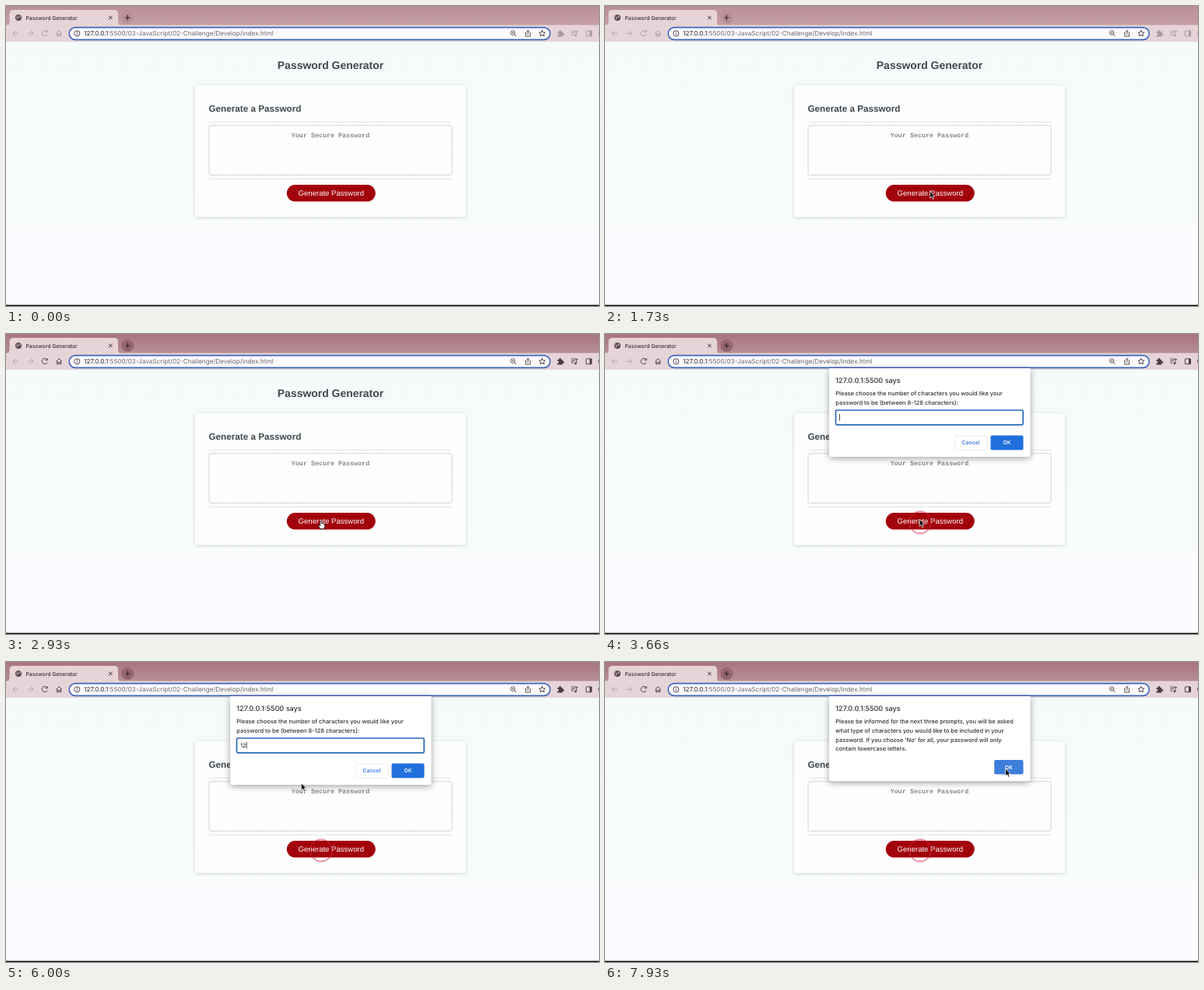
Animation of 762 by 386 pixels, one loop 8 s. Source, as an HTML page:

```html
<!DOCTYPE html>
<html lang="en">
<head>
<meta charset="utf-8">
<title>Password Generator</title>
<style>
  html, body { margin: 0; width: 100%; height: 100%; overflow: hidden; background: #fafbfd; }
  svg { display: block; width: 762px; height: 386px; }
  text { font-family: Inter, Roboto, sans-serif; fill: #303134; text-rendering: geometricPrecision; }
  .page text { font-family: "Liberation Sans", Arial, sans-serif; fill: #3f484d; }
  .page .mono { font: bold 8.37px "Liberation Mono", monospace; fill: #85888a; }
  .page .label { font-size: 9.56px; fill: #fff; }
  .bold { font-weight: bold; }
  .icon { fill: none; stroke: #55494d; stroke-width: 1; }
  .body { font-size: 7.45px; font-weight: 500; }
  .button { font-size: 6.8px; font-weight: 600; text-anchor: middle; }
  .says { font-size: 9.1px; font-weight: 500; }
  .panel { fill: #fff; filter: drop-shadow(0 2px 4px rgba(0, 0, 0, .36)); }
  #stage { --strip: #a87580; --strip-low: #b88e97; --ink: #4b4044; --plus: #966773; }
  #stage.inactive { --strip: #bb8e98; --strip-low: #c69fa7; --ink: #aa999d; --plus: #b98f99; }
  .state { stroke: var(--ink); }
</style>
</head>
<body>
<svg id="stage" viewBox="0 0 762 386">
  <defs>
    <linearGradient id="stripFill" x2="0" y2="1">
      <stop style="stop-color:var(--strip)"/>
      <stop offset="1" style="stop-color:var(--strip-low)"/>
    </linearGradient>
    <linearGradient id="pageFill" x2="0" y2="1">
      <stop stop-color="#f5fafb"/>
      <stop offset=".65" stop-color="#f8fbfc"/>
      <stop offset=".75" stop-color="#fafbfe"/>
    </linearGradient>
  </defs>

  <g class="page">
    <rect y="46" width="762" height="340" fill="url(#pageFill)"/>
    <text class="bold" x="417" y="81" font-size="13.95" text-anchor="middle">Password Generator</text>
    <rect x="243" y="102" width="348" height="169.5" rx="3" fill="#fdfdfe"
      style="filter:drop-shadow(0 1px 2px rgba(0,0,0,.16))"/>
    <text class="bold" x="260.5" y="136" font-size="11.7">Generate a Password</text>
    <path d="M261 149.2H573M261 222.4H573" stroke="#e2e4e6"/>
    <rect x="261" y="153.8" width="312" height="63.6" rx="2" fill="#fefefe" stroke="#bcbfc1" stroke-dasharray="1.8 .8"/>
    <text class="mono" x="417" y="169" text-anchor="middle">Your Secure Password</text>
    <rect x="360.8" y="230" width="114" height="21.6" rx="10.8" fill="#a2000b"/>
    <text class="label" x="417.8" y="244.3" text-anchor="middle">Generate Password</text>
    <circle id="ring" cx="405" cy="242.5" r="14" fill="none" stroke="#cc2637" stroke-opacity=".5" stroke-width="1.8"/>
    <rect y="384.6" width="762" height="1.4" fill="#080808"/>
  </g>

  <g>
    <rect width="762" height="25" fill="url(#stripFill)"/>
    <rect y="24.5" width="762" height="21.5" fill="#e6d4d8"/>
    <path d="M1 25Q4.5 24.5 4.5 21V10Q4.5 5 9.5 5H139Q144 5 144 10V21Q144 24.5 147 25Z" fill="#e6d4d8"/>
    <g class="icon">
      <circle cx="16" cy="15" r="3.6" fill="#55494d"/>
      <path d="M13 14L15.3 15 14.8 17M16.6 12.4L17 14 18.8 14.6" stroke="#e6d4d8"/>
      <path d="M132 12.7L136.6 17.3M136.6 12.7L132 17.3" stroke="#332b2e"/>
    </g>
    <text x="25.5" y="17.6" font-size="6.8" font-weight="500">Password Generator</text>
    <circle cx="156.3" cy="15" r="8" style="fill:var(--plus)"/>
    <path d="M152.8 15H159.8M156.3 11.5V18.5" stroke="#33272a" stroke-width="1.2"/>

    <g class="icon">
      <path d="M16.3 35.2H9M12.3 31.8L8.9 35.2 12.3 38.6M27.5 35.2H35M31.6 31.8L35 35.2 31.6 38.6" stroke="#b5a3a7"/>
      <path class="state" d="M52.6 33A3.5 3.5 0 1 0 53 36.4M53.3 31V33.6H50.7"/>
      <path class="state" d="M64.6 35.3L68.2 31.8 71.8 35.3M65.7 34.8V38.7H67.3V36.4H69.1V38.7H70.7V34.8"/>
      <rect x="81.2" y="27.6" width="618" height="15.8" rx="7.9" fill="#fdfcfd" stroke="#3d67bd" stroke-width="1.6"/>
      <circle cx="91.3" cy="35.3" r="3.6"/>
      <path d="M91.3 34.8V37.3M91.3 33V34"/>
      <circle cx="651.2" cy="34.5" r="2.7"/>
      <path d="M653.2 36.5L655.8 39M650 34.5H652.4"/>
      <path d="M669 34.3H667.8V39H673.7V34.3H672.5M670.8 36.8V31.5M669.2 33L670.8 31.4 672.4 33"/>
      <path d="M689 31.3L690.1 33.9 693 34.1 690.8 36 691.5 38.8 689 37.3 686.5 38.8 687.2 36 685 34.1 687.9 33.9Z"/>
      <path d="M708.5 33H710.7A1.4 1.4 0 1 1 713.3 33H715.2V35A1.4 1.4 0 1 1 715.2 37.5V39.4H708.5V37.3A1.3 1.3 0 1 0 708.5 34.9Z" style="fill:var(--ink);stroke:none"/>
      <path class="state" d="M726.3 32.2H733M726.3 34.6H731M726.3 37H729.5M733 38V32.5H735"/>
      <circle cx="731.8" cy="38" r="1.3" style="fill:var(--ink);stroke:none"/>
      <rect class="state" x="745.4" y="31.9" width="7.2" height="6.8" rx=".7"/>
      <path class="state" d="M751.2 32V38.6" stroke-width="2.4"/>
      <circle class="state" cx="765.5" cy="35.3" r="4"/>
    </g>
    <text x="100.2" y="38.3" font-size="8.16" style="fill:#66686b">
      <tspan fill="#232427">127.0.0.1</tspan>:5500/03-JavaScript/02-Challenge/Develop/index.html</text>
  </g>

  <g id="prompt">
    <path class="panel" d="M288 44H546.5V155Q546.5 158 543.5 158H291Q288 158 288 155Z"/>
    <text class="says" x="296.3" y="62.5">127.0.0.1:5500 says</text>
    <text class="body"><tspan x="296.3" y="79.3">Please choose the number of characters you would like your</tspan><tspan x="296.3" y="91">password to be (between 8-128 characters):</tspan></text>
    <rect id="field" x="296.5" y="98" width="240.7" height="18.8" rx="1.5" fill="#fff"/>
    <text class="body" id="typed" x="301" y="110"></text>
    <path id="caret" d="M0 102.8V111.6" stroke="#222" stroke-width=".8"/>
    <rect x="449.3" y="131" width="41.5" height="18" rx="2" fill="#fff" stroke="#e9eaed" stroke-width=".8"/>
    <text class="button" x="470" y="142.4" style="fill:#3975d5">Cancel</text>
    <rect id="ok" x="495.5" y="130.6" width="42" height="18.6" rx="2"/>
    <text class="button" x="516.5" y="142.4" style="fill:#fff">OK</text>
  </g>

  <g id="notice">
    <path class="panel" d="M288 44H546.5V150.5Q546.5 153.5 543.5 153.5H291Q288 153.5 288 150.5Z"/>
    <text class="says" x="296.3" y="62.5">127.0.0.1:5500 says</text>
    <text class="body"><tspan x="296.3" y="79.3">Please be informed for the next three prompts, you will be asked</tspan><tspan x="296.3" y="91">what type of characters you would like to be included in your</tspan><tspan x="296.3" y="102.6">password. If you choose 'No' for all, your password will only</tspan><tspan x="296.3" y="114.2">contain lowercase letters.</tspan></text>
    <rect x="500.2" y="126" width="37.3" height="18.5" rx="2" fill="#3e7edb"/>
    <text class="button" x="518.8" y="137.8" style="fill:#fff">OK</text>
  </g>

  <g id="cursor" stroke="#fff" stroke-width=".7" stroke-linejoin="round">
    <path id="arrow" d="M0 0V9.2L2.1 7.3 3.6 10.6 5.2 9.9 3.8 6.7H6.6Z" fill="#0b0b0b"/>
    <path id="hand" d="M-.9 .8Q0 -.7 .9 .8V3.7Q2 3 2.5 4Q3.6 3.5 4 4.6Q5.1 4.4 5.1 5.6V7.6L4 10.8H-.6L-3.2 6.8Q-3.4 5.3 -2 5.9L-.9 7Z" fill="#fff" stroke="#171717" stroke-width=".9"/>
  </g>
</svg>
<script>
  const LOOP = 8000, ACTIVATE = 1860, CLICK = 3200, PROMPT = 3400, PRESS = 6900, NOTICE = 7200;
  const path = [ // time, x, y of the pointer tip
    [60, 432, 346], [860, 418, 241], [1700, 417.4, 238], [1900, 417.4, 238],
    [2500, 404.6, 240], [3600, 404.6, 240], [4300, 379.3, 155.7], [6000, 379.3, 155.7],
    [6750, 524.6, 143], [7250, 524.6, 143], [7650, 514.7, 137.5], [LOOP, 514.7, 137.5]
  ];
  const el = id => document.getElementById(id);
  const show = (id, on) => el(id).style.display = on ? "" : "none";
  const clamp01 = v => Math.min(1, Math.max(0, v));

  function pointer(t) {
    const i = Math.max(1, path.findIndex(p => p[0] > t));
    const [t0, x0, y0] = path[i - 1], [t1, x1, y1] = path[i];
    const u = clamp01((t - t0) / (t1 - t0));
    const s = u * u * (3 - 2 * u);
    return [x0 + (x1 - x0) * s, y0 + (y1 - y0) * s];
  }

  function draw(t) {
    const [x, y] = pointer(t);
    const hand = t >= ACTIVATE && t < PROMPT;
    const prompting = t >= PROMPT && t < NOTICE;
    const focused = t < PRESS;
    const typed = t < 5200 ? "" : t < 5520 ? "1" : "12";

    el("stage").classList.toggle("inactive", t < ACTIVATE);
    show("ring", t >= CLICK);
    el("ring").setAttribute("r", 5 + 9 * clamp01((t - CLICK) / 200));
    show("prompt", prompting);
    show("notice", t >= NOTICE);

    el("typed").textContent = typed;
    show("caret", focused);
    const end = typed && prompting ? el("typed").getComputedTextLength() : 0;
    el("caret").setAttribute("transform", `translate(${301.5 + end} 0)`);
    el("field").setAttribute("stroke", focused ? "#2d68b8" : "#eceef0");
    el("field").setAttribute("stroke-width", focused ? 1.7 : .8);
    const hover = x > 495.5 && x < 537.5 && y > 130.6 && y < 149.2;
    el("ok").setAttribute("fill", hover ? "#3e7edb" : "#2170de");

    show("cursor", t >= 60);
    show("hand", hand);
    show("arrow", !hand);
    el("cursor").setAttribute("transform", `translate(${x} ${y})`);
  }

  const start = performance.now();
  (function tick() {
    draw((performance.now() - start) % LOOP);
    requestAnimationFrame(tick);
  })();
</script>
</body>
</html>
```
